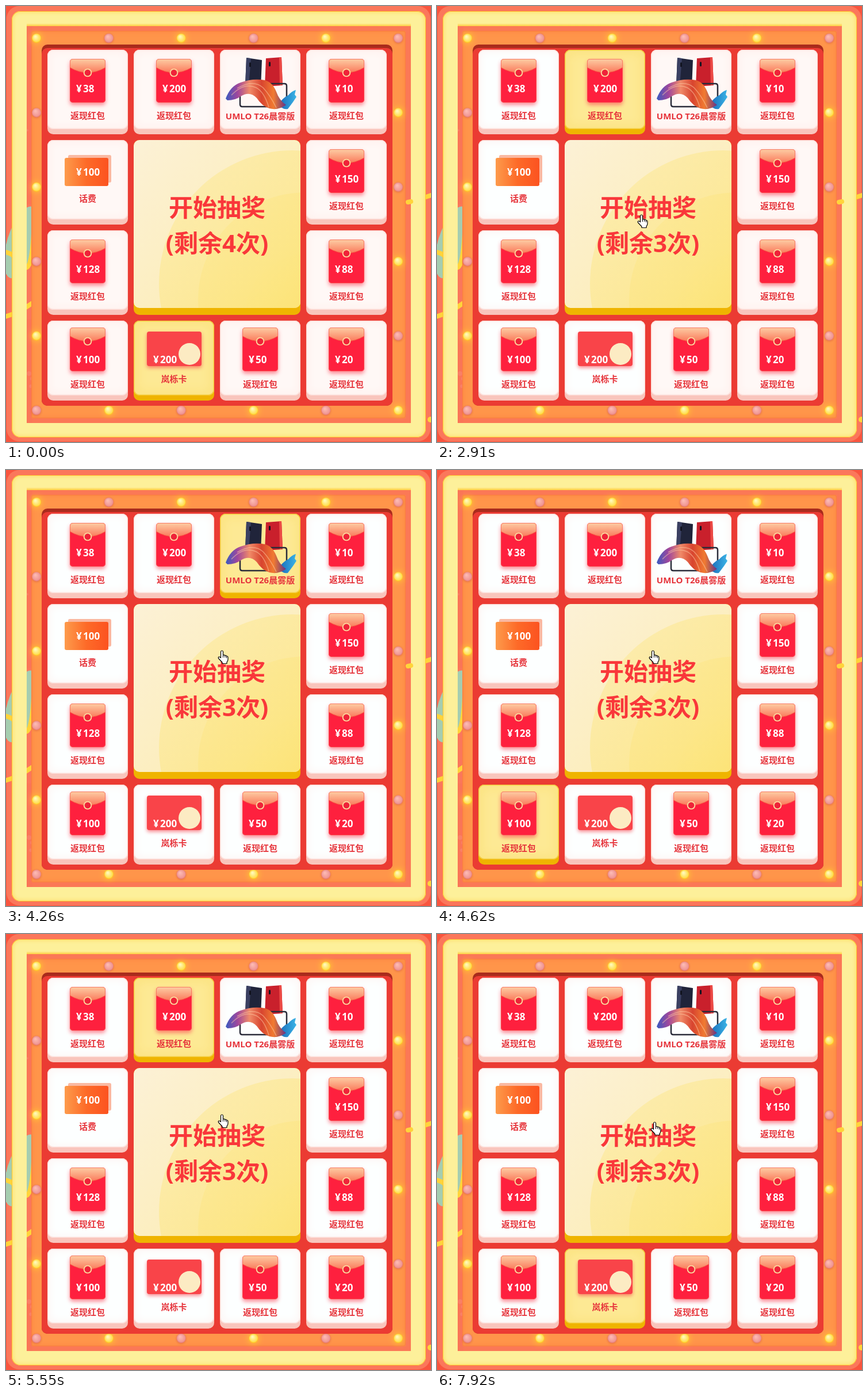
Animation, 739 px wide and 758 px high, one loop 8 s. Source, as an HTML page with a canvas:

```html
<!DOCTYPE html>
<html lang="zh">
<head>
<meta charset="utf-8">
<title>开始抽奖</title>
<style>
html, body { margin: 0; width: 100%; height: 100%; overflow: hidden; background: #f9563f; }
canvas { display: block; width: 739px; height: 758px; }
</style>
</head>
<body>
<canvas id="stage" width="739" height="758"></canvas>
<script>
const canvas = document.getElementById('stage');
const FONT = '"Open Sans", "Noto Sans CJK SC", "Noto Sans CJK", sans-serif';
const LOOP = 8000, TICK = 30;
const ROW_Y = [76, 233, 390, 547];
let c = canvas.getContext('2d');

// Clockwise from the top left: column, row, amount, kind
const PRIZES = [
  [0, 0, '38'], [1, 0, '200'], [2, 0, '', 'phone'], [3, 0, '10'],
  [3, 1, '150'], [3, 2, '88'], [3, 3, '20'], [2, 3, '50'],
  [1, 3, '200', 'card'], [0, 3, '100'], [0, 2, '128'], [0, 1, '100', 'bill']
];
const START = 8;

// Moments when the light hops on: speeding up, steady, slowing down
const HOPS = [1260, 1740, 2190, 2580, 2910, 3210, 3450, 3640, 3780, 3860];
for (let k = 0; k < 26; k++) HOPS.push(3906 + 49 * k);
HOPS.push(5181, 5235, 5305, 5395, 5550, 5760, 5990, 6270, 6630, 6990, 7440, 7920);

const POINTER = [
  [210, 724, 58], [660, 348, 362], [3480, 348, 362], [3720, 368, 312],
  [4200, 368, 312], [4260, 368, 313], [5850, 368, 313], [6060, 371, 326]
];

function box(x, y, w, h, r, fill) {
  c.beginPath();
  c.roundRect(x, y, w, h, r);
  if (fill) { c.fillStyle = fill; c.fill(); }
}

function shadow(color, blur, dy = 0) {
  c.shadowColor = color;
  c.shadowBlur = blur;
  c.shadowOffsetY = dy;
}

function glowBox(x, y, w, h, r, fill, glow, blur, line) {
  c.save();
  box(x, y, w, h, r, fill);
  c.clip();
  shadow(glow, blur);
  c.strokeStyle = glow;
  c.lineWidth = line;
  box(x, y, w, h, r);
  c.stroke();
  c.restore();
}

function gradient(x0, y0, x1, y1, ...colors) {
  const g = c.createLinearGradient(x0, y0, x1, y1);
  colors.forEach((s, i) => g.addColorStop(i / (colors.length - 1), s));
  return g;
}

function text(s, x, y, size, fill, align = 'center') {
  c.font = `bold ${size}px ${FONT}`;
  c.textAlign = align;
  c.fillStyle = fill;
  c.fillText(s, x, y);
}

function shape(d, fill, stroke, width = 1) {
  const p = new Path2D(d);
  if (fill) { c.fillStyle = fill; c.fill(p); }
  if (stroke) { c.strokeStyle = stroke; c.lineWidth = width; c.stroke(p); }
}

function disc(x, y, r, fill) {
  c.beginPath();
  c.arc(x, y, r, 0, 7);
  c.fillStyle = fill;
  c.fill();
}

function bulb(x, y, on) {
  c.save();
  shadow(on ? '#ffd52c' : 'rgba(200,70,60,.5)', on ? 12 : 4, on ? 0 : 1);
  disc(x, y, 8, on ? '#ffc928' : '#e98280');
  c.restore();
  const g = c.createRadialGradient(x - 2, y - 3, 1, x, y, 8);
  g.addColorStop(0, on ? '#fff9b8' : '#fcb9b3');
  g.addColorStop(1, on ? '#ffd83a' : '#ee8f8d');
  disc(x, y - .5, 7.3, g);
}

function backdrop() {
  c.fillStyle = '#f9553f';
  c.fillRect(0, 0, 739, 758);
  box(1, 0, 737, 757, 22, '#fb775b');

  c.save();
  c.translate(27, 411);
  c.rotate(.3);
  c.beginPath();
  c.ellipse(0, 0, 25, 65, 0, 0, 7);
  c.fillStyle = '#a5cdb0';
  c.fill();
  c.restore();
  c.lineCap = 'round';
  shape('M-5 427Q12 428 28 450T48 395M-5 541Q20 535 48 515M690 341Q715 338 745 327', null, '#ffd43a', 8);
  shape('M697 643Q703 634 712 631', null, '#f8c9a0', 4);
  [[37, 216, 2], [40, 639, 4], [45, 648, 3], [43, 661, 3], [738, 719, 5]].forEach(
    ([x, y, r], i) => disc(x, y, r, i < 4 ? '#f6a29a' : '#ffd43a'));

  // Yellow frame
  c.save();
  c.beginPath();
  c.roundRect(10, 9, 720, 741, 15);
  c.rect(36, 32, 668, 693);
  c.fillStyle = '#fdf09a';
  c.fill('evenodd');
  c.clip('evenodd');
  shadow('#ffc52c', 6);
  c.strokeStyle = '#ffc52c';
  c.lineWidth = 2;
  box(10, 9, 720, 741, 15);
  c.stroke();
  c.restore();
  c.fillStyle = gradient(0, 30, 0, 36, '#fdf09a', '#ffc72e');
  c.fillRect(36, 30, 668, 5);

  c.fillStyle = '#fb7856';
  c.fillRect(46, 35, 658, 690);
  c.fillStyle = 'rgba(250,116,86,.75)';
  c.fillRect(36, 35, 10, 310);
  c.fillRect(36, 545, 10, 180);
  shape('M699 341L704 340', null, '#ffd43a', 8);
  glowBox(44, 43, 651, 674, 4, '#ff954a', '#fb8040', 8, 3);

  for (let i = 0; i < 6; i++)
    for (let j = 0; j < 6; j++)
      if (i % 5 === 0 || j % 5 === 0)
        bulb(53 + 125.8 * i, 56 + 129.4 * j, (i + j) % 2 === 0);

  box(62, 67, 610, 628, 10, '#a92b1c');
  box(62, 73, 610, 622, 10, '#eb3b33');

  // Centre button
  box(222, 233, 290, 304, 10, '#efb400');
  c.save();
  box(222, 233, 290, 292, 10, gradient(222, 233, 512, 525, '#fcf1d6', '#fcecae'));
  c.clip();
  [[498, 483, 232], [521, 511, 187], [523, 538, 107]].forEach(([x, y, r]) => {
    disc(x, y, r, gradient(x - r, y - r, x, y, 'rgba(253,232,145,.45)', 'rgba(252,226,110,.5)'));
  });
  c.restore();
}

function amount(n, x, y) {
  text('¥', x + 1, y, 17, '#fff', 'left');
  text(n, x + 13, y, 17, '#fff', 'left');
}

function envelope(x, y) {
  c.save();
  shadow('rgba(250,60,80,.6)', 7, 4);
  box(x, y, 62, 76, 5, '#fe203e');
  c.restore();
  c.save();
  box(x, y, 62, 76, 5);
  c.clip();
  c.translate(x, y);
  shape('M0 0H62V15Q31 33 0 15Z', gradient(0, 0, 0, 25, '#fdcda4', '#fa7658'), '#f6503f', 1);
  c.restore();
  box(x + .5, y + .5, 61, 75, 5);
  c.strokeStyle = 'rgba(248,110,90,.5)';
  c.lineWidth = 1;
  c.stroke();
  disc(x + 31, y + 24, 7.3, '#fcd79c');
  disc(x + 31, y + 24, 5.4, '#ef2339');
}

function phones(x, y) {
  c.save();
  c.translate(x, y);
  shape('M46 14L73 18L71 66L44 62Z', '#20243a');
  shape('M80 15L107 13L109 62L78 64Z', '#c9202c');
  shape('M46 14L54 15L50 63L44 62Z', '#3a4062');
  shape('M103 13L107 13L109 62L104 62Z', '#ec4a45');
  [[51, 22], [85, 21]].forEach(([a, b]) => box(a, b, 3, 8, 1.5, '#11131f'));
  shape('M39 59H112Q116 59 116 63V95Q116 99 112 99H39Q35 99 35 95V63Q35 59 39 59Z', null, '#2a2c3a', 2.5);
  shape('M102 96Q108 84 119 79Q125 72 132 70L130 78L133 82L127 91L118 103Q111 105 102 96Z',
    gradient(102, 0, 133, 0, '#1768b8', '#3bb4e6'));
  shape('M10 85Q18 63 36 57Q58 49 78 53Q91 56 98 73Q103 88 115 96Q101 106 86 102Q73 98 64 84Q52 71 36 81Q27 88 13 88Z',
    gradient(10, 0, 114, 0, '#3b5ac0', '#a0479c', '#f08a68', '#d8442f', '#f17b31', '#6a3482'));
  shape('M20 79Q42 56 63 66Q77 73 85 100M30 67Q58 51 75 66Q88 80 98 101', null, 'rgba(255,205,165,.5)', 1.5);
  c.restore();
}

function cell(i, lit, fresh) {
  const [col, row, n, kind] = PRIZES[i];
  const x = 72 + 150 * col, y = ROW_Y[row], h = row === 3 ? 139 : 147;
  const red = '#e6343b';
  box(x, y, 140, h, 10, lit ? '#efb400' : '#f9c5bc');
  glowBox(x, y, 140, h - 9, 10,
    lit ? '#fde994' : fresh ? '#fff8f6' : '#fdffff',
    lit ? '#f4cd3e' : '#fde0db', lit ? 18 : 14, 3);

  if (kind === 'phone') {
    phones(x, y);
    text('UMLO T26晨雾版', x + 70, y + 121, 15, red);
  } else if (kind === 'bill') {
    box(x + 36, y + 26, 75, 48, 3, '#fab9a2');
    box(x + 30, y + 31, 76, 49, 3, gradient(x + 30, 0, x + 106, 0, '#fd9b4c', '#fd6a28', '#fc5320'));
    amount(n, x + 49, y + 62);
    text('话费', x + 70, y + 107, 15, red);
  } else if (kind === 'card') {
    c.save();
    shadow('rgba(245,60,70,.6)', 6, 3);
    box(x + 23, y + 19, 95, 60, 4, '#f94449');
    c.restore();
    disc(x + 97, y + 58, 19, '#fcebc3');
    amount(n, x + 33, y + 74);
    text('岚栎卡', x + 70, y + 107, 15, red);
  } else {
    const up = row === 3 ? 4 : 0;
    envelope(x + 39, y + 16 - up);
    amount(n, x + 49, y + 74);
    text('返现红包', x + 70, y + 120 - up, 15, red);
  }
}

function pointer(t) {
  if (t < POINTER[0][0]) return;
  let k = POINTER.length - 1;
  while (POINTER[k][0] > t) k--;
  const [t0, x0, y0] = POINTER[k], [t1, x1, y1] = POINTER[k + 1] || [LOOP, x0, y0];
  const p = (t - t0) / (t1 - t0), e = p * (2 - p);
  c.save();
  c.translate(Math.round(x0 + (x1 - x0) * e), Math.round(y0 + (y1 - y0) * e));
  c.lineJoin = 'round';
  shape('M5.5 13V3Q5.7 1 7.5 1T9.5 3V9Q12 7.8 12.8 9.8Q15 8.8 15.6 10.8Q18 10.4 18 13V16Q18 19 16 21V23.5H8V21.5L1.5 14.5Q.6 12.4 2.4 11.8Q4 11.8 5.5 13.5Z',
    '#fff', '#000', 1.2);
  shape('M9.5 9V13M12.8 10V13M15.6 11V14', null, '#000', 1);
  c.restore();
}

const base = document.createElement('canvas');
base.width = 739;
base.height = 758;
const screen2d = c;
c = base.getContext('2d');
backdrop();
c = screen2d;

function draw(t) {
  const hops = HOPS.filter(h => h <= t).length;
  c.drawImage(base, 0, 0);
  PRIZES.forEach((_, i) =>
    cell(i, i === (START + hops) % 12, (i - START + 12) % 12 >= hops));
  text('开始抽奖', 367, 366, 42, '#f9373a');
  text(`(剩余${t < 1140 ? 4 : 3}次)`, 367, 428, 42, '#f9373a');
  pointer(t);
}

let last = -1;
function loop(now) {
  const t = Math.floor(now % LOOP / TICK) * TICK;
  if (t !== last) draw(last = t);
  requestAnimationFrame(loop);
}
requestAnimationFrame(loop);
</script>
</body>
</html>
```
